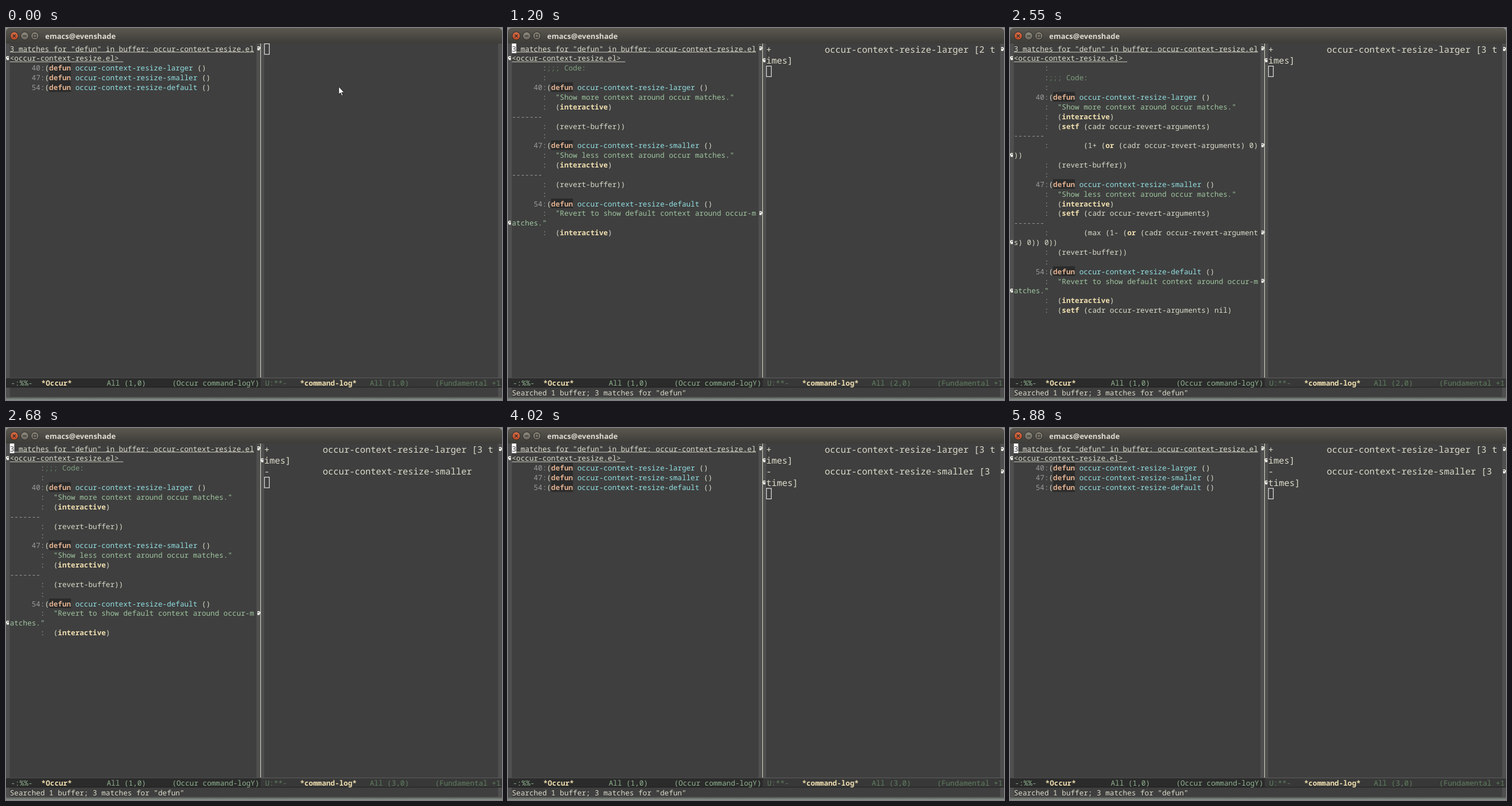
An HTML page that plays this animation: 864 px wide and 648 px high, repeating every 5930 ms.

```html
<!DOCTYPE html>
<html lang="en">
<head>
<meta charset="utf-8">
<title>Occur context resize</title>
<style>
  html, body { margin: 0; width: 100%; height: 100%; overflow: hidden; background: #3f3f3f; }
  svg { display: block; width: 864px; height: 648px; }
  text { font: 15px "Noto Sans Mono", "DejaVu Sans Mono", monospace; fill: #dcdccc;
         white-space: pre; text-rendering: geometricPrecision; font-variant-ligatures: none; }
  #title { font: bold 15.4px "Open Sans", "Noto Sans", sans-serif; fill: #dfdbd2; }
  .log { font-size: 18.333px; }
  .num { fill: #9a9a9a; }
  .match { fill: #dfaf8f; font-weight: bold; }
  .fn { fill: #93e0e3; }
  .doc { fill: #9fc59f; }
  .delim { fill: #5f7f5f; }
  .comment { fill: #7f9f7f; }
  .key, .id { fill: #f0dfaf; font-weight: bold; }
  .mode { fill: #8fb28f; }
  .dim { fill: #5f7f5f; }
  .invert { fill: #3f3f3f; }
  .arrow { fill: #f4f4ec; }
</style>
</head>
<body>
<svg viewBox="0 0 1024 768">
  <defs>
    <linearGradient id="bar" x2="0" y2="1"><stop stop-color="#5b5850"/><stop offset="1" stop-color="#3d3c38"/></linearGradient>
    <linearGradient id="close" x2="0" y2="1"><stop stop-color="#d9714c"/><stop offset="1" stop-color="#b8461f"/></linearGradient>
    <linearGradient id="grey" x2="0" y2="1"><stop stop-color="#8d897e"/><stop offset="1" stop-color="#68655c"/></linearGradient>
    <linearGradient id="edge" x2="0" y2="1"><stop stop-color="#555653"/><stop offset="1" stop-color="#8b938d"/></linearGradient>
    <path id="hook" d="M2 0H6L8 2V4.5L6.3 6.5 7 8H2V3H3L5 4 6 3V2H2Z"/>
  </defs>

  <rect width="1024" height="768" fill="#8f9a94"/>
  <path d="M0 32V8Q0 0 8 0H1016Q1024 0 1024 8V32Z" fill="url(#bar)"/>
  <g stroke="#33312d" stroke-width="1.2">
    <circle cx="17" cy="16.3" r="8.3" fill="url(#close)"/>
    <circle cx="38.5" cy="16.3" r="8.3" fill="url(#grey)"/>
    <circle cx="59.5" cy="16.3" r="8.3" fill="url(#grey)"/>
    <path d="M14 13.3l6 6m0-6l-6 6M35 16.3h7M56.5 13.3h6v6h-6z" fill="none" stroke-width="1.5"/>
  </g>
  <text id="title" x="81" y="22">emacs@evenshade</text>

  <rect y="32" width="1024" height="730" fill="#3f3f3f"/>
  <path d="M0 32h8v730h-8zM517 32h16v690h-16zM1016 32h8v730h-8z" fill="#4f4f4f"/>
  <path d="M525.6 32V722" stroke="#dcdccc" stroke-width="1.2"/>
  <rect y="722" width="526" height="20" fill="#2b2b2b"/>
  <rect x="526" y="722" width="498" height="20" fill="#383838"/>
  <path d="M0 722.5H526" stroke="#565656"/>
  <path d="M526 722.5H1024" stroke="#686868"/>
  <path d="M0 741.5H1024" stroke="#1c1c1c"/>
  <rect y="762" width="1024" height="6" fill="url(#edge)"/>
  <g id="view"></g>
</svg>
<script>
const LOOP = 5930;
const NAME = 'occur-context-resize';

// time, context lines, cursor lit, times larger, times smaller
const STEPS = [
  [0, 0, 0, 0, 0], [490, 0, 1, 0, 0], [530, 1, 1, 1, 0], [1010, 1, 0, 1, 0],
  [1200, 2, 1, 2, 0], [1870, 3, 1, 3, 0], [2550, 3, 0, 3, 0], [2680, 2, 1, 3, 1],
  [3160, 1, 1, 3, 2], [3660, 1, 0, 3, 2], [4020, 0, 1, 3, 3], [4530, 0, 0, 3, 3],
  [4890, 0, 1, 3, 3], [5520, 0, 0, 3, 3], [5880, 0, 1, 3, 3]
];

const SETF = '  (setf (cadr occur-revert-arguments)';
const BODY = '  (interactive)';
const END = '  (revert-buffer))';
const MATCHES = [
  { line: 40, fn: 'larger', before: ['', ';;; Code:', ''],
    after: ['  "Show more context around occur matches."', BODY, SETF] },
  { line: 47, fn: 'smaller', before: ['        (1+ (or (cadr occur-revert-arguments) 0)))', END, ''],
    after: ['  "Show less context around occur matches."', BODY, SETF] },
  { line: 54, fn: 'default', before: ['        (max (1- (or (cadr occur-revert-arguments) 0)) 0))', END, ''],
    after: ['  "Revert to show default context around occur-matches."', BODY, SETF + ' nil)'] }
];

const TOKEN = /(;;; )|(Code:)|(defun)|(occur-context-resize-\w+)|(".*")|((?<=\()(?:interactive|setf|or)\b)/;
const KINDS = ['delim', 'comment', 'match', 'fn', 'doc', 'key'];

const esc = s => s.replace(/&/g, '&amp;').replace(/</g, '&lt;');
const text = (x, y, s, kind = '') => `<text x="${x}" y="${y}" class="${kind}">${esc(s)}</text>`;
const rect = (x, y, w, h, fill) => `<rect x="${x}" y="${y}" width="${w}" height="${h}" fill="${fill}"/>`;

// Split code into [text, kind] pieces
function paint(code) {
  const parts = [];
  let m;
  while ((m = TOKEN.exec(code))) {
    const kind = KINDS[m.slice(1).findIndex(Boolean)];
    parts.push([code.slice(0, m.index)], [m[0], kind]);
    code = code.slice(m.index + m[0].length);
  }
  return [...parts, [code]];
}

// A text window that wraps lines and marks each wrap in the fringes
class Pane {
  constructor(o) { Object.assign(this, o); this.row = 0; this.out = ''; }
  get top() { return 32 + this.row * this.h; }
  line(parts) {
    let col = 0;
    for (let [s, kind = ''] of parts) {
      while (s) {
        if (col === this.cols) { this.wrap(); col = 0; }
        const piece = s.slice(0, this.cols - col);
        this.piece(col, piece, kind);
        col += piece.length;
        s = s.slice(piece.length);
      }
    }
    this.row++;
  }
  piece(col, s, kind) {
    const x = this.x + col * this.w, wide = s.length * this.w;
    if (kind === 'match') this.out += rect(x, this.top, wide, this.h, '#2b2b2b');
    if (kind === 'under') this.out += rect(x, this.top + 17.3, wide, 1.1, '#dcdccc');
    if (s.trim()) this.out += text(x, this.top + this.base, s, kind + ' ' + this.kind);
  }
  wrap() {
    const dy = this.h / 2 - 4;
    this.out += `<use href="#hook" class="arrow" x="${this.right}" y="${this.top + dy}"/>`;
    this.row++;
    this.out += `<use href="#hook" class="arrow" transform="translate(${this.left + 8} ${this.top + dy}) scale(-1 1)"/>`;
  }
}

function occur(context, lit) {
  const p = new Pane({ x: 8, w: 9, h: 20, base: 16, cols: 56, left: 0, right: 517, kind: '' });
  const code = (s, n = '') => p.line([[`${n}:`.padStart(8), 'num'], ...paint(s)]);
  p.line([[`3 matches for "defun" in buffer: ${NAME}.el<${NAME}.el> `, 'under']]);
  MATCHES.forEach((m, i) => {
    if (i && context) p.line([['-------', 'num']]);
    m.before.slice(3 - context).forEach(s => code(s));
    code(`(defun ${NAME}-${m.fn} ()`, m.line);
    m.after.slice(0, context).forEach(s => code(s));
  });
  if (lit) p.out += rect(8, 32, 9, 20, '#fff') + text(8, 48, '3', 'invert');
  return p.out;
}

function commandLog(larger, smaller) {
  const p = new Pane({ x: 533, w: 11, h: 23, base: 18.5, cols: 43, left: 525.5, right: 1016, kind: 'log' });
  const entry = (key, fn, n) => {
    if (n) p.line([[key.padEnd(11) + `${NAME}-${fn}` + (n > 1 ? ` [${n} times]` : '')]]);
  };
  entry('+', 'larger', larger);
  entry('-', 'smaller', smaller);
  return p.out + `<rect x="533.6" y="${p.top + .6}" width="10" height="21.8" fill="none" stroke="#fff" stroke-width="1.2"/>`;
}

function modeLine(x, kind, cells) {
  return cells.map(([col, s, k]) => text(x + col * 9, 738, s, k || kind)).join('');
}

const POINTER = '<path d="M687 121v16l3.6-3.3 2.7 6.3 2.4-1-2.7-6h5z" fill="#fff" stroke="#111" stroke-width="1"/>';
const view = document.getElementById('view');

function draw([, context, lit, larger, smaller]) {
  const line = 1 + !!larger + !!smaller;
  view.innerHTML = occur(context, lit) + commandLog(larger, smaller) +
    modeLine(1, 'mode', [[1, '-:%%-'], [8, '*Occur*', 'id'], [23, 'All (1,0)'], [38, '(Occur command-logY)']]) +
    modeLine(526, 'dim', [[1, 'U:**-'], [9, '*command-log*', 'id'], [25, `All (${line},0)`], [40, '(Fundamental +1']]) +
    (larger ? text(8, 758, 'Searched 1 buffer; 3 matches for "defun"') : POINTER);
}

let shown;
const start = performance.now();
function tick() {
  const t = (performance.now() - start) % LOOP;
  const step = STEPS.findLast(s => s[0] <= t);
  if (step !== shown) draw(shown = step);
  requestAnimationFrame(tick);
}
tick();
</script>
</body>
</html>
```
